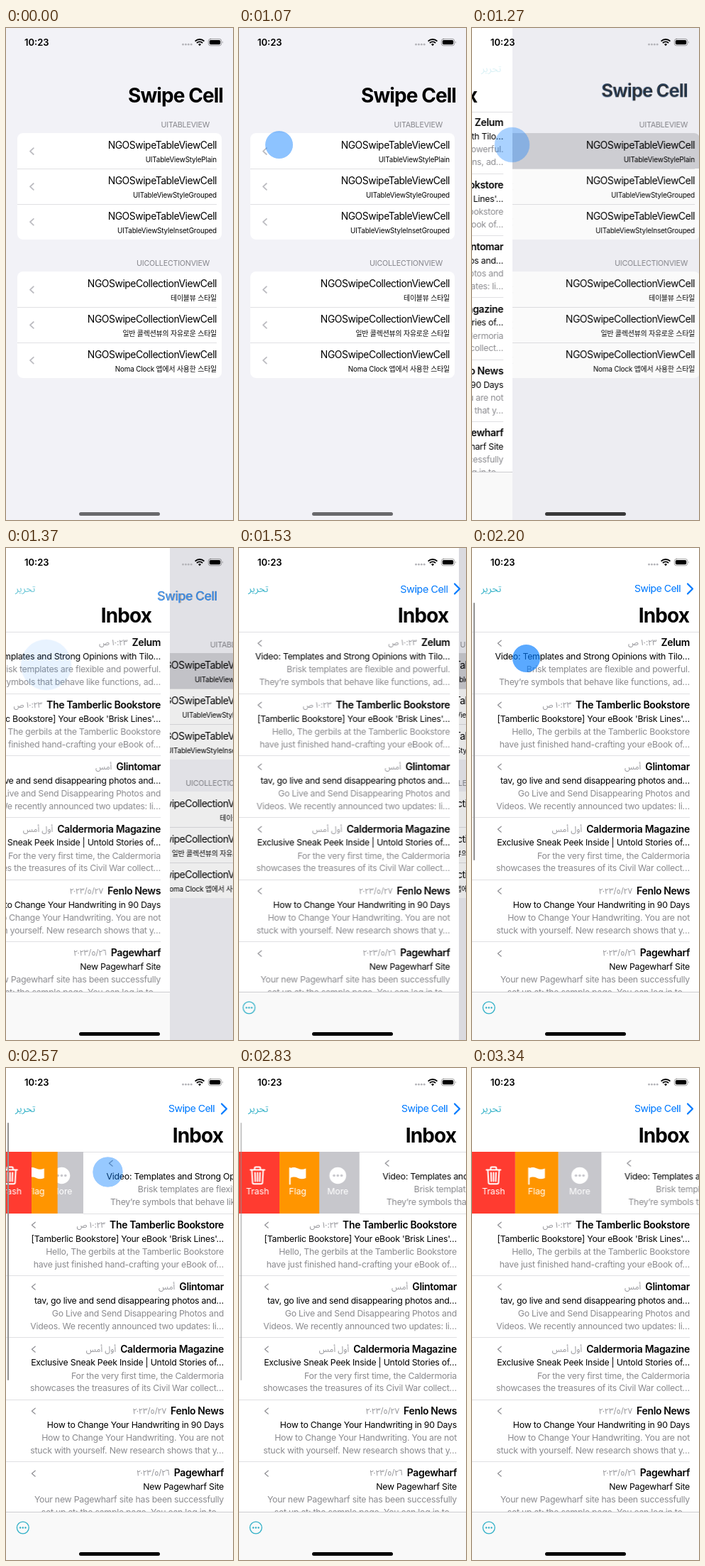
Animation of 320 by 693 pixels, one loop 3.38 s. Source, as an HTML page:

```html
<!DOCTYPE html>
<html lang="en">
<head>
<meta charset="utf-8">
<title>Swipe cell demo</title>
<style>
html, body { margin: 0; width: 100%; height: 100%; overflow: hidden; }
body { font-family: Inter, "Noto Sans CJK KR", "Noto Sans CJK", "Noto Sans Arabic", "DejaVu Sans", sans-serif; color: #000; }
#stage { position: relative; width: 320px; height: 693px; overflow: hidden; background: #f2f2f7; }
#stage *, svg { position: absolute; }
svg * { position: static; }
svg { left: 0; top: 0; overflow: visible; fill: none; stroke-linecap: round; stroke-linejoin: round; }
p { margin: -10px 0 0; line-height: 20px; height: 20px; white-space: nowrap; text-align: right; }
.layer { left: 0; top: 0; width: 320px; height: 693px; }
.anim { animation: 3380ms linear infinite both; }
/* critically damped spring: 1 - (1 + u) e^-u */
.spring { animation-timing-function: linear(0, .09 5.6%, .264 11.1%, .442 16.7%, .594 22.2%, .722 28.4%, .801 33.3%, .908 44.4%, .96 55.6%, .983 66.7%, .997 89%, 1); }

/* menu screen */
#menu { background: #f2f2f7; animation-name: menu; }
.head { right: 33px; font-size: 10.67px; letter-spacing: -.018em; color: #85858b; }
.card { left: 16px; width: 288px; height: 149.6px; border-radius: 8px; background: #fff; overflow: hidden; }
.card hr { left: 0; width: 281px; }
hr { margin: 0; border: 0; height: 1px; background: #e0e0e3; }
.name { right: 7px; font-size: 13.95px; letter-spacing: -.034em; }
.note { right: 7px; font-size: 9.85px; letter-spacing: -.015em; }
#press { left: 0; top: 0; width: 288px; height: 50px; background: #d1d1d6; animation-name: press; }
#dim { background: #000; animation-name: dim; }

/* inbox screen */
#inbox { background: #fff; overflow: hidden; animation-name: push; }
.row { left: 0; width: 320px; height: 87.4px; }
.row hr { left: 0; top: 87px; width: 307px; }
.from { right: 13px; display: flex; gap: 6px; font-size: 13.95px; font-weight: 600; letter-spacing: -.023em; }
.from * { position: static !important; }
.from i { font: 400 11.5px/20px Inter, "Noto Sans Arabic", "DejaVu Sans", sans-serif; letter-spacing: 0; color: #929297; }
.subj, .body { right: 13px; font-size: 12.3px; letter-spacing: -.019em; }
.body { color: #8a8a8e; }
.act { left: -61px; top: 0; width: 61px; height: 87.4px; color: #fff; }
.act p { left: 0; width: 61px; top: 56.8px; text-align: center; font-size: 12.3px; }
.slide { animation-name: slide; }
#acts { left: 0; top: 117.6px; width: 320px; height: 87.4px; }
#bar { left: 0; top: 625px; width: 320px; height: 68px; background: #f9f9f9; border-top: 1px solid #cdcdd0; box-sizing: border-box; }
#scroll { left: 1.8px; top: 77px; width: 2.6px; height: 363px; border-radius: 2px; background: #929292; animation-name: scroll; }

/* navigation and system chrome */
.big { font-size: 28px; font-weight: 700; letter-spacing: -.033em; }
#title { right: 14px; top: 95px; transform-origin: 100% 50%; animation-name: shrink; }
#back { right: 26px; top: 57px; font-size: 13.95px; letter-spacing: -.03em; color: #007aff; transform-origin: 100% 50%; animation-name: back; }
#box { right: 14px; top: 95px; animation-name: box; }
#edit { left: 13px; top: 57px; font-size: 14px; color: #30b0c7; animation-name: show; }
#arrow { animation-name: arrow; }
#clock { left: 26px; top: 20px; font-size: 13px; font-weight: 600; }
#home { left: 103px; top: 682.4px; width: 114px; height: 4.2px; border-radius: 3px; animation-name: home; }
#dot { left: -19.5px; top: -19.5px; width: 39px; height: 39px; border-radius: 50%; background: #007aff; animation-name: touch; }

@keyframes menu {
  0%, 36.36% { transform: none; }
  51.15%, 100% { transform: translateX(96px); }
}
@keyframes dim {
  0%, 36.36% { opacity: 0; }
  51.15%, 100% { opacity: .1; }
}
@keyframes push {
  0%, 36.36% { transform: translateX(-320px); }
  51.15%, 100% { transform: none; }
}
@keyframes box {
  0%, 36.36% { transform: translateX(-364px); }
  51.15%, 100% { transform: none; }
}
@keyframes shrink {
  0%, 36.36% { transform: none; opacity: 1; }
  51.15%, 100% { transform: translate(-12px, -38px) scale(.48); opacity: 0; }
}
@keyframes back {
  0%, 36.36% { transform: translate(12px, 38px) scale(2.08); opacity: 0; }
  51.15%, 100% { transform: none; opacity: 1; }
}
@keyframes show {
  0%, 36.36% { opacity: 0; }
  51.15%, 100% { opacity: 1; }
}
@keyframes arrow {
  0%, 41.4% { opacity: 0; }
  45%, 100% { opacity: 1; }
}
@keyframes press {
  0%, 34.5% { opacity: 0; }
  34.51%, 100% { opacity: 1; }
}
@keyframes home {
  0%, 36.36% { background: #69696c; }
  39%, 100% { background: #000; }
}
@keyframes scroll {
  0%, 50.3% { opacity: 0; }
  52%, 79.9% { opacity: 1; }
  87.3%, 100% { opacity: 0; }
}
@keyframes touch {
  0%, 31.6% { transform: translate(56px, 164px); opacity: 0; }
  31.61%, 34.5% { transform: translate(56px, 164px); opacity: .45; animation-timing-function: ease-in-out; }
  43.37% { transform: translate(56px, 164px) scale(2.05); opacity: 0; }
  43.38%, 63% { transform: translate(76px, 155px); opacity: 0; }
  63.01%, 66% { transform: translate(76px, 155px); opacity: .65; animation-timing-function: cubic-bezier(.5, 0, .8, .5); }
  74.26% { transform: translate(143px, 146px); opacity: .45; animation-timing-function: ease-in-out; }
  83.1%, 100% { transform: translate(143px, 146px) scale(2.05); opacity: 0; }
}
@keyframes slide {
  0%, 66% { transform: none; animation-timing-function: cubic-bezier(.5, 0, .8, .5); }
  74.26% { transform: translateX(calc(67px * var(--part))); animation-timing-function: cubic-bezier(.14, .84, .3, 1); }
  98.8%, 100% { transform: translateX(calc(182.4px * var(--part))); }
}
</style>
</head>
<body>
<div id="stage">
  <div id="menu" class="layer anim spring"></div>
  <div id="dim" class="layer anim spring"></div>
  <div id="inbox" class="layer anim spring"></div>
  <p id="title" class="big anim spring">Swipe Cell</p>
  <p id="back" class="anim spring">Swipe Cell</p>
  <p id="box" class="big anim spring">Inbox</p>
  <p id="edit" class="anim spring" dir="rtl">تحرير</p>
  <svg id="arrow" class="anim" width="320" height="693"><path d="M304 50.5l7 7-7 7" stroke="#007aff" stroke-width="2.2"/></svg>
  <p id="clock">10:23</p>
  <svg width="320" height="40">
    <g fill="#b4b4b9"><circle cx="249.5" cy="23.2" r="1.4"/><circle cx="253.4" cy="23.2" r="1.4"/><circle cx="257.3" cy="23.2" r="1.4"/><circle cx="261.2" cy="23.2" r="1.4"/></g>
    <g stroke="#000" stroke-width="1.9" stroke-linecap="butt"><path d="M266.6 18.6a9.2 9.2 0 0 1 12.8 0M268.9 21.1a5.8 5.8 0 0 1 8.2 0"/></g>
    <path d="M273 25.2l-2-2.2a2.9 2.9 0 0 1 4 0z" fill="#000"/>
    <rect x="285.3" y="15.4" width="18.4" height="9.4" rx="2.9" stroke="#000" stroke-opacity=".4" stroke-width=".9"/>
    <rect x="286.8" y="16.9" width="15.4" height="6.4" rx="1.7" fill="#000"/>
    <path d="M305 18.5q1.6 1.6 0 3.2z" fill="#000" fill-opacity=".45"/>
  </svg>
  <div id="home" class="anim"></div>
  <div id="dot" class="anim"></div>
</div>
<script>
const $ = id => document.getElementById(id);
const line = (cls, y, text) => `<p class="${cls}" style="top:${y}px">${text}</p>`;
const icon = shapes => `<svg width="61" height="87">${shapes}</svg>`;
const PITCH = 49.8, ROW = 87.4;

const card = (top, head, press, name, notes) => line('head', top - 11.3, head) +
  `<div class="card" style="top:${top}px">${press}` + notes.map((note, i) => {
    const y = i * PITCH;
    return (i ? `<hr style="top:${y}px">` : '') +
      icon(`<path d="M22.8 ${y + 21.2}l-4.8 4.4 4.8 4.4" stroke="#bcbcc1" stroke-width="1.8"/>`) +
      line('name', y + 17, name) + line('note', y + 37, note);
  }).join('') + '</div>';

$('menu').innerHTML =
  card(148.3, 'UITABLEVIEW', '<div id="press" class="anim"></div>', 'NGOSwipeTableViewCell',
    ['UITableViewStylePlain', 'UITableViewStyleGrouped', 'UITableViewStyleInsetGrouped']) +
  card(343.3, 'UICOLLECTIONVIEW', '', 'NGOSwipeCollectionViewCell',
    ['테이블뷰 스타일', '일반 콜렉션뷰의 자유로운 스타일', 'Noma Clock 앱에서 사용한 스타일']);

const mails = [
  ['Zelum', '١٠:٢٣ ص', 'Video: Templates and Strong Opinions with Tilo…',
    'Brisk templates are flexible and powerful.', 'They’re symbols that behave like functions, ad…'],
  ['The Tamberlic Bookstore', '١٠:٢٣ ص', "[Tamberlic Bookstore] Your eBook 'Brisk Lines'…",
    'Hello, The gerbils at the Tamberlic Bookstore', 'have just finished hand-crafting your eBook of…'],
  ['Glintomar', 'أمس', 'tav, go live and send disappearing photos and…',
    'Go Live and Send Disappearing Photos and', 'Videos. We recently announced two updates: li…'],
  ['Caldermoria Magazine', 'أول أمس', 'Exclusive Sneak Peek Inside | Untold Stories of…',
    'For the very first time, the Caldermoria', 'showcases the treasures of its Civil War collect…'],
  ['Fenlo News', '٢٠٢٣/٥/٢٧', 'How to Change Your Handwriting in 90 Days',
    'How to Change Your Handwriting. You are not', 'stuck with yourself. New research shows that y…'],
  ['Pagewharf', '٢٠٢٣/٥/٢٦', 'New Pagewharf Site',
    'Your new Pagewharf site has been successfully', 'set up at: the sample page. You can log in to…']
];

const mail = ([from, date, subject, ...body], i) =>
  `<div class="row ${i ? '' : 'slide anim'}" style="--part:1;top:${117.6 + i * ROW}px">` +
  icon('<path d="M41.2 12.2l-4.8 4 4.8 4" stroke="#8e8e93" stroke-width="1.2"/>') +
  line('from', 15.8, `<i dir="rtl">${date}</i><span>${from}</span>`) +
  line('subj', 35.7, subject) + line('body', 53.8, body[0]) + line('body', 71.7, body[1]) +
  '<hr></div>';

const dots = (x, y, gap, r, color) => [-1, 0, 1].map(k =>
  `<circle cx="${x + k * gap}" cy="${y}" r="${r}" fill="${color}"/>`).join('');

const action = (part, color, label, shapes) =>
  `<div class="act slide anim" style="--part:${part};background:${color}">${icon(shapes)}<p>${label}</p></div>`;

$('inbox').innerHTML = '<hr style="top:117.5px;width:320px">' + mails.map(mail).join('') +
  '<div id="acts">' +
  action(1, '#c7c7cc', 'More', '<circle cx="30.5" cy="33.5" r="11.8" fill="#fff"/>' + dots(30.5, 33.5, 5.3, 1.8, '#c7c7cc')) +
  action(2 / 3, '#ff9500', 'Flag', '<path d="M19.6 23v22.5" stroke="#fff" stroke-width="2"/><path d="M20 23.5c4-2.4 7.5-1.6 11 0s7 1.8 11.2 0v13.5c-4 1.9-7.7 1.7-11.2 0s-7-2-11 0z" fill="#fff"/>') +
  action(1 / 3, '#ff3b30', 'Trash', '<path d="M20.5 25.5h20M26.5 25v-2.2q0-1.3 1.3-1.3h5.4q1.3 0 1.3 1.3v2.2M22.5 26l1 17.5q.1 1.8 1.9 1.8h10.2q1.8 0 1.9-1.8l1-17.5M27 29.5l.4 12M30.5 29.5v12M34 29.5l-.4 12" stroke="#fff" stroke-width="2"/>') +
  '</div><div id="scroll" class="anim"></div><div id="bar">' +
  icon('<circle cx="23.8" cy="21.5" r="8.4" stroke="#30b0c7" stroke-width="1.3"/>' + dots(23.8, 21.5, 3.7, 1.2, '#30b0c7')) +
  '</div>';
</script>
</body>
</html>
```
